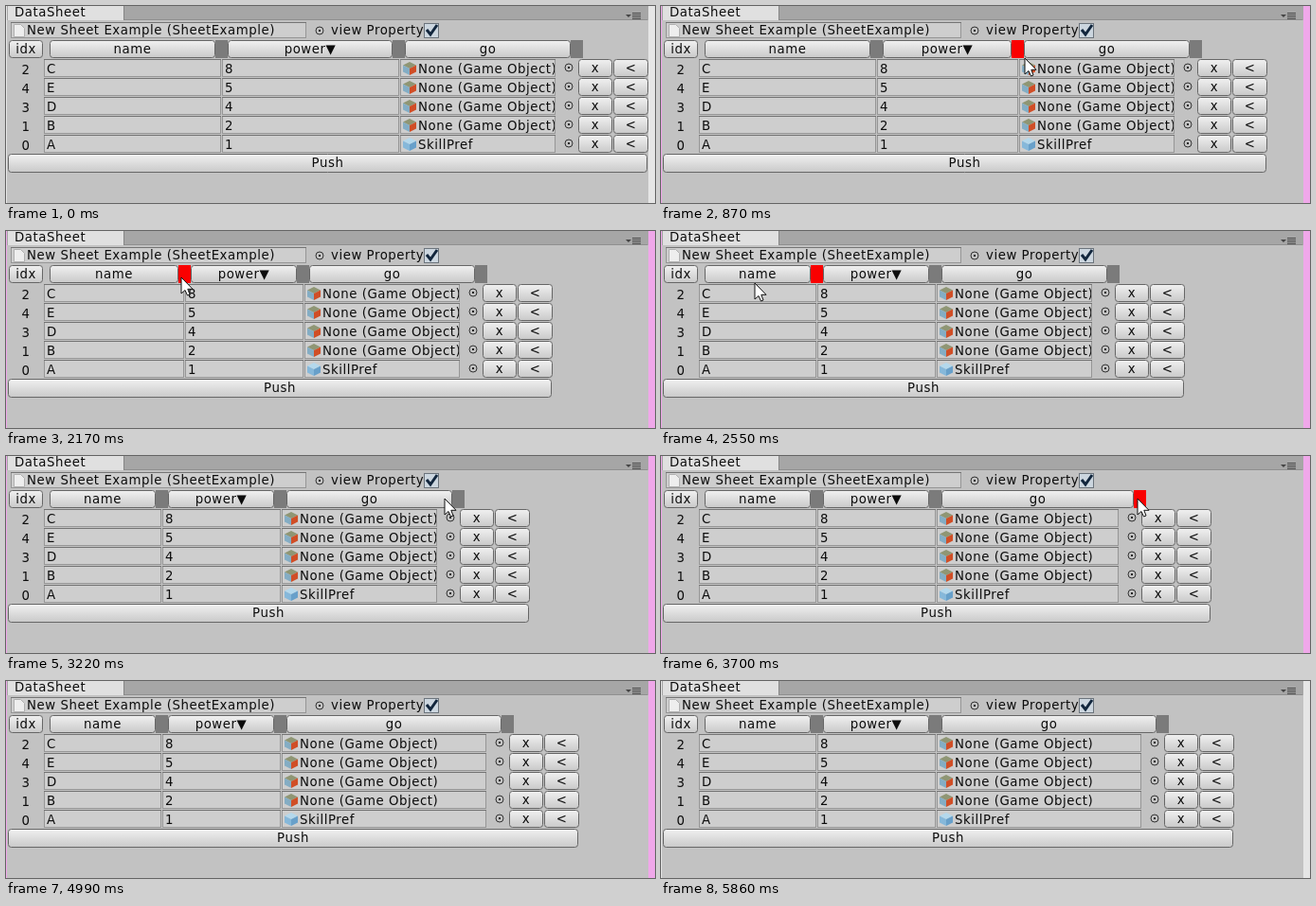
Recreate the animation shown at these times as an HTML page with a canvas. Size 685 by 208 pixels, loop 5960 ms.

```html
<!DOCTYPE html>
<html lang="en">
<head>
<meta charset="utf-8">
<title>DataSheet</title>
<style>
html, body { margin: 0; width: 100%; height: 100%; overflow: hidden; background: #c2c2c2; }
canvas { display: block; }
</style>
</head>
<body>
<canvas id="stage" width="685" height="208"></canvas>
<script>
const ctx = document.getElementById('stage').getContext('2d');
const LOOP = 5960, W = 685, H = 208;
const MIN_WIDTH = 111, GAP = 14, LEFT = 46, TOP = 56, ROW = 20;

const rows = 'C8 E5 D4 B2 A1'.split(' ').map(s => ({
  idx: s.charCodeAt(0) - 65, name: s[0], power: s[1]
}));

// Each column is resized by dragging the handle on its right
const columns = [
  { label: 'name', width: 174, press: 2090, release: 2600 },
  { label: 'power▼', width: 173, press: 690, release: 1320 },
  { label: 'go', width: 174, press: 3520, release: 4290 }
];

const linear = p => p;
const smooth = p => p * p * (3 - 2 * p);
const clamp = (v, a, b) => Math.min(b, Math.max(a, v));
const within = (t, a, b) => t >= a && t < b;

const move = (from, to, x, y, ease = smooth) => ({ from, to, x, y, ease });
const ENTRY = { x: 531, y: 150 };
const moves = [
  move(70, 460, 422, 46),
  move(690, 1100, 336, 66, linear),
  move(1320, 1840, 224, 46),
  move(2090, 2380, 84, 55, linear),
  move(2520, 2680, 234, 54),
  move(2710, 3300, 475, 45),
  move(3520, 3740, 509, 45, linear),
  move(3920, 4060, 527, 45),
  move(4300, 4790, 166, 208)
];

function pointerAt(t) {
  let { x, y } = ENTRY;
  for (const m of moves) {
    const p = m.ease(clamp((t - m.from) / (m.to - m.from), 0, 1));
    x += (m.x - x) * p;
    y += (m.y - y) * p;
  }
  return { x: Math.round(x), y: Math.round(y) };
}

// After leaving the stage the pointer peeks in and later passes in an arc
function visiblePointer(t) {
  if (within(t, 70, 4790)) return pointerAt(t);
  if (within(t, 4940, 4990)) return { x: 281, y: 201 };
  const p = (t - 5140) / 310;
  if (within(p, 0, 1)) return { x: 242 + 171 * p, y: H - 106 * Math.sin(Math.PI * p) };
  return null;
}

function widthAt({ width, press, release }, t) {
  const drag = pointerAt(clamp(t, press, release)).x - pointerAt(press).x;
  return Math.max(MIN_WIDTH, width + drag);
}

function rect(x, y, w, h, color) {
  ctx.fillStyle = color;
  ctx.fillRect(x, y, w, h);
}

function shape(points, fill, line) {
  ctx.beginPath();
  for (const [x, y] of points) ctx.lineTo(x, y);
  ctx.closePath();
  ctx.fillStyle = fill;
  ctx.fill();
  if (!line) return;
  ctx.strokeStyle = line;
  ctx.lineWidth = 1;
  ctx.stroke();
}

function text(s, x, y, align = 'left') {
  ctx.fillStyle = '#0c0c0c';
  ctx.textAlign = align;
  ctx.fillText(s, x, y);
}

function button(label, x, y, w, h = 19) {
  const g = ctx.createLinearGradient(0, y, 0, y + h);
  g.addColorStop(0, '#f2f2f2');
  g.addColorStop(1, '#c8c8c8');
  ctx.beginPath();
  ctx.roundRect(x + 0.5, y + 0.5, w - 1, h - 1, 3);
  ctx.fillStyle = g;
  ctx.fill();
  ctx.save();
  ctx.clip();
  text(label, x + w / 2, y + 14, 'center');
  ctx.restore();
  ctx.strokeStyle = '#666';
  ctx.lineWidth = 1;
  ctx.stroke();
}

function field(x, y, w, h = 19) {
  rect(x, y, w, h, '#969696');
  rect(x + 1, y + 1, w - 2, h - 2, '#cecece');
  rect(x, y, w, 1, '#747474');
}

function picker(x, y) {
  ctx.beginPath();
  ctx.arc(x, y, 4, 0, 7);
  ctx.strokeStyle = '#333';
  ctx.lineWidth = 1;
  ctx.stroke();
  rect(x - 1, y - 1, 2, 2, '#222');
}

function cube(x, y, top, left, right) {
  const r = 7, h = r / 2, mid = [x, y];
  shape([mid, [x - r, y - h], [x, y - r], [x + r, y - h]], top);
  shape([mid, [x - r, y - h], [x - r, y + h], [x, y + r]], left);
  shape([mid, [x + r, y - h], [x + r, y + h], [x, y + r]], right);
}

function frame(focused) {
  rect(0, 0, W, H, focused ? '#f0a8ea' : '#e6e6e6');
  rect(1, 0, 677, H, '#c2c2c2');
  rect(1, 0, 677, 15, '#a6a6a6');
  rect(2, 0, 122, 15, '#e0e0e0');
  rect(124, 0, 1, 15, '#858585');
  rect(125, 14, 552, 1, '#8f8f8f');
  text('DataSheet', 9, 11);
  shape([[654, 9], [660, 9], [657, 12]], '#444');
  for (let y = 7; y < 14; y += 2) rect(661, y, 9, 1, '#4a4a4a');
}

function toolbar() {
  field(5, 17, 312, 17);
  shape([[8.5, 19.5], [15.5, 19.5], [19.5, 23.5], [19.5, 32.5], [8.5, 32.5]], '#eee', '#b0b0b0');
  text('New Sheet Example (SheetExample)', 22, 30);
  picker(331, 26);
  text('view Property', 343, 30);
  rect(441, 18, 16, 16, '#6c747c');
  rect(442, 19, 14, 14, '#ccd6df');
  ctx.beginPath();
  ctx.moveTo(444, 25);
  ctx.lineTo(448, 30);
  ctx.lineTo(455, 20);
  ctx.strokeStyle = '#12263d';
  ctx.lineWidth = 3;
  ctx.stroke();
}

function header(widths, t) {
  button('idx', 3, 36, 36);
  let x = LEFT;
  columns.forEach(({ label, press, release }, i) => {
    button(label, x, 36, widths[i] + 1);
    x += widths[i] + GAP;
    rect(x - 13, 36, 13, 19, within(t, press, release) ? '#fa0000' : '#7b7b7b');
  });
}

function drawRow({ idx, name, power }, y, powerX, goX, end) {
  const base = y + 15, prefab = idx === 0;
  text(idx, 21, base + 1, 'center');
  field(40, y, powerX - 41);
  text(name, 43, base);
  field(powerX, y, goX - powerX - 1);
  text(power, powerX + 3, base);
  field(goX, y, end - goX - 10);

  ctx.save();
  ctx.beginPath();
  ctx.rect(goX, y, end - goX - 11, 19);
  ctx.clip();
  if (prefab) cube(goX + 10, y + 10, '#b4d8ec', '#86b8da', '#68a0ca');
  else cube(goX + 10, y + 10, '#8f9674', '#84adc4', '#d04e26');
  text(prefab ? 'SkillPref' : 'None (Game Object)', goX + 19, base);
  ctx.restore();

  picker(end + 4, y + 9);
  button('x', end + 14, y, 36);
  button('<', end + 51, y, 37);
}

function arrow(x, y) {
  const outline = [[0, 0], [0, 17], [4, 13.5], [6.5, 19], [9, 18], [6.8, 12.3], [12, 12.3]];
  shape(outline.map(([dx, dy]) => [x + dx, y + dy]), '#fff', '#111');
}

function ibeam(x, y) {
  rect(x, y - 7, 1, 14, '#222');
  for (const end of [y - 8, y + 7]) rect(x - 2, end, 5, 1, '#222');
}

function drawPointer(t, goX) {
  const at = visiblePointer(t);
  if (!at) return;
  const overText = within(at.x, 40, goX) && within(at.y, TOP + 2, TOP + ROW * rows.length);
  (overText ? ibeam : arrow)(at.x, at.y);
}

function draw(t) {
  const widths = columns.map(c => widthAt(c, t));
  const powerX = LEFT + widths[0] + 8;
  const goX = powerX + widths[1] + GAP + 1;
  const end = goX + widths[2];
  ctx.font = '13.3px "DejaVu Sans", Verdana, sans-serif';
  ctx.letterSpacing = '0.55px';
  frame(within(t, 690, 5860));
  toolbar();
  header(widths, t);
  rows.forEach((r, i) => drawRow(r, TOP + ROW * i, powerX, goX, end));
  button('Push', 2, TOP + ROW * rows.length, end + 85, 20);
  drawPointer(t, goX);
}

const start = performance.now();
function tick() {
  draw((performance.now() - start) % LOOP);
  requestAnimationFrame(tick);
}
tick();
</script>
</body>
</html>
```
